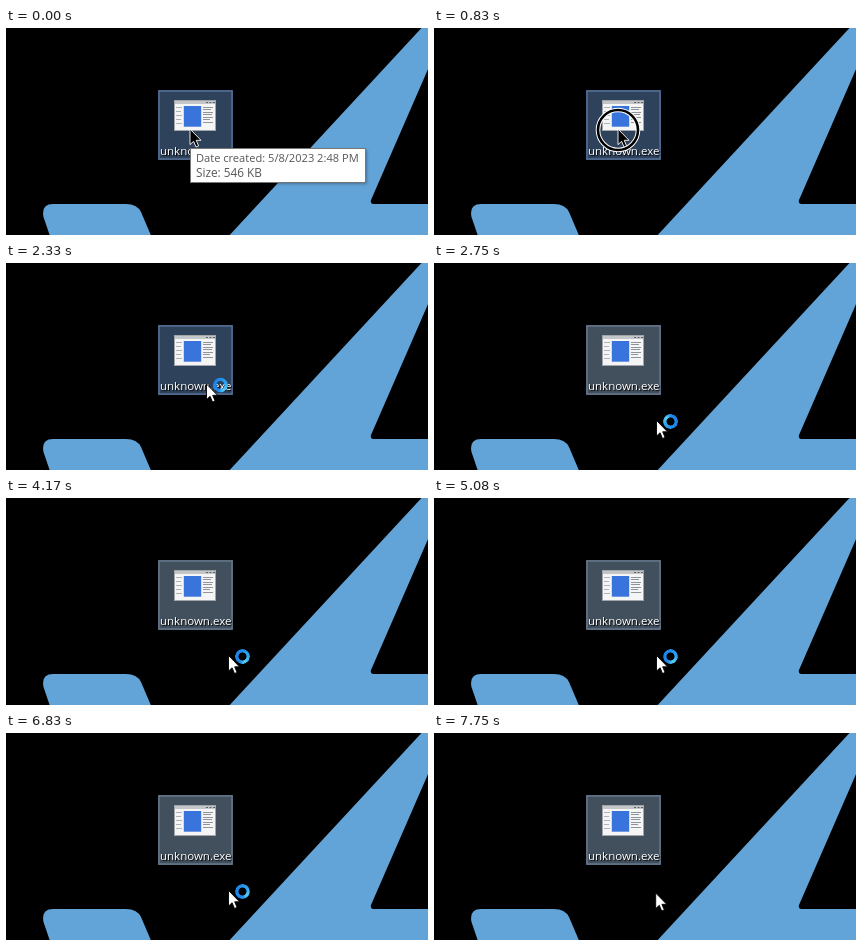
These frames come from a looping animation (422 by 207 pixels, 8000 ms). An HTML page:

```html
<!DOCTYPE html>
<html lang="en">
<head>
<meta charset="utf-8">
<title>Opening a desktop program</title>
<style>
  html, body { margin: 0; width: 100%; height: 100%; overflow: hidden; background: #000; }
  svg { position: absolute; left: 0; top: 0; display: block; }
  text { font-family: "Open Sans", "Noto Sans", sans-serif; }
  #wallpaper { filter: blur(.7px); }
  #icon { filter: blur(.35px); }
  #spinner {
    position: absolute; left: 0; top: 0; width: 15px; height: 15px; border-radius: 50%;
    background: conic-gradient(#1c86ea, #1c86ea 35%, #2ea6f2 65%, #55cdf6 85%, #1c86ea);
    -webkit-mask: radial-gradient(circle, transparent 3.7px, #000 4.3px);
    mask: radial-gradient(circle, transparent 3.7px, #000 4.3px);
  }
</style>
</head>
<body>
<svg width="422" height="207" viewBox="0 0 422 207">
  <rect width="422" height="207"/>
  <g id="wallpaper" fill="#63a4d8">
    <path d="M415.500 0L417.500-2H426V32L365 172Q364 175.500 367 176H426V211H220Z"/>
    <path d="M45 211L37.500 189Q35 176 47 176H120Q131 176 135 184L146.500 211Z"/>
  </g>

  <rect id="tile" x="152.900" y="62.900" width="73.200" height="68.200" stroke-width="1.600"/>
  <g id="icon">
    <rect x="168" y="72" width="42" height="31" fill="#a2a6aa"/>
    <rect x="169" y="76" width="40" height="26" fill="#f5f5f5"/>
    <rect x="169" y="73" width="40" height="3" fill="#c3c6c9"/>
    <path d="M200 74.500h2m1.500 0h2m1.500 0h2" stroke="#5b6066"/>
    <rect x="177.800" y="78" width="17.400" height="20.700" fill="#3974dc"/>
    <path d="M170 79.500h6m-6 4h5m-5 4h6m-6 4h5m-5 4h6" stroke="#aeb3b8"/>
    <path d="M197 79.500h10m-10 2h8m-8 3h10m-10 2h9m-9 3h10m-10 2h7m-7 3h10" stroke="#8e9499"/>
  </g>
  <text x="154" y="127" font-size="11.500" fill="#fff" style="text-shadow:1px 1px 1px #000">unknown.exe</text>

  <g id="tip">
    <rect x="185" y="121" width="175" height="34" fill="#fff" style="filter:drop-shadow(1.5px 1.5px 1.5px rgba(0,0,0,.3))"/>
    <rect x="184.500" y="120.500" width="175" height="34" fill="#fff" stroke="#767676"/>
    <g fill="#575757">
      <text x="190" y="134" font-size="11.100">Date created: 5/8/2023 2:48 PM</text>
      <text x="190" y="149" font-size="11.800">Size: 546 KB</text>
    </g>
  </g>

  <g id="ring" fill="none">
    <circle cx="184" cy="102" stroke="#fff" stroke-width="4.600"/>
    <circle cx="184" cy="102" stroke="#000" stroke-width="2.600"/>
  </g>
  <path id="arrow" d="M0 0V15.600L3.600 12.300L6 18L8.600 16.900L6.200 11.300H11Z" stroke-width=".9"/>
</svg>
<div id="spinner"></div>

<script>
  const $ = id => document.getElementById(id);
  const STEP = 1000 / 12, LOOP = 8000;
  const BUSY_FROM = 16, BUSY_TO = 87, LEAVE = 29;

  // step: [x, y] of the pointer tip, held until the next entry
  const pointer = {
    0: [184, 101], 27: [190, 107], 28: [200.500, 121], 29: [209, 134], 30: [215, 145],
    31: [219, 152], 32: [222, 156], 33: [222.500, 157.500], 92: [222, 159], 93: [221.700, 160]
  };
  // step: [radius, opacity] of the click ring
  const clicks = {
    0: [0, 0], 9: [12, 1], 10: [20, 1], 11: [20.500, .6], 12: [12, 1],
    13: [20, 1], 14: [20.500, .6], 15: [21, .25], 16: [0, 0]
  };
  const tipFade = { 0: [1], 7: [.4], 8: [0] };

  function held(table, step) {
    let value;
    for (const key in table) if (+key <= step) value = table[key];
    return value;
  }

  function paint(id, fill, stroke) {
    $(id).setAttribute("fill", fill);
    $(id).setAttribute("stroke", stroke);
  }

  function draw(time) {
    const step = Math.floor((time % LOOP + 5) / STEP) % 96;
    const [x, y] = held(pointer, step);
    const [radius, alpha] = held(clicks, step);

    if (step < LEAVE) paint("tile", "#2e425b", "#56719a");
    else paint("tile", "#424f5d", "#667a8d");

    // the plain pointer is dark until the program starts loading
    if (step < BUSY_FROM) paint("arrow", "#000", "#fff");
    else paint("arrow", "#fff", "#000");

    $("tip").setAttribute("opacity", held(tipFade, step)[0]);
    $("ring").setAttribute("opacity", alpha);
    for (const circle of $("ring").children) circle.setAttribute("r", radius);
    $("arrow").setAttribute("transform", `translate(${x} ${y})`);

    const busy = step >= BUSY_FROM && step < BUSY_TO;
    $("spinner").style.visibility = busy ? "visible" : "hidden";
    $("spinner").style.transform =
      `translate(${x + 6.5}px, ${y - 6.5}px) rotate(${step * 33}deg)`;
  }

  const start = performance.now();
  function tick() {
    draw(performance.now() - start);
    requestAnimationFrame(tick);
  }
  tick();
</script>
</body>
</html>
```
